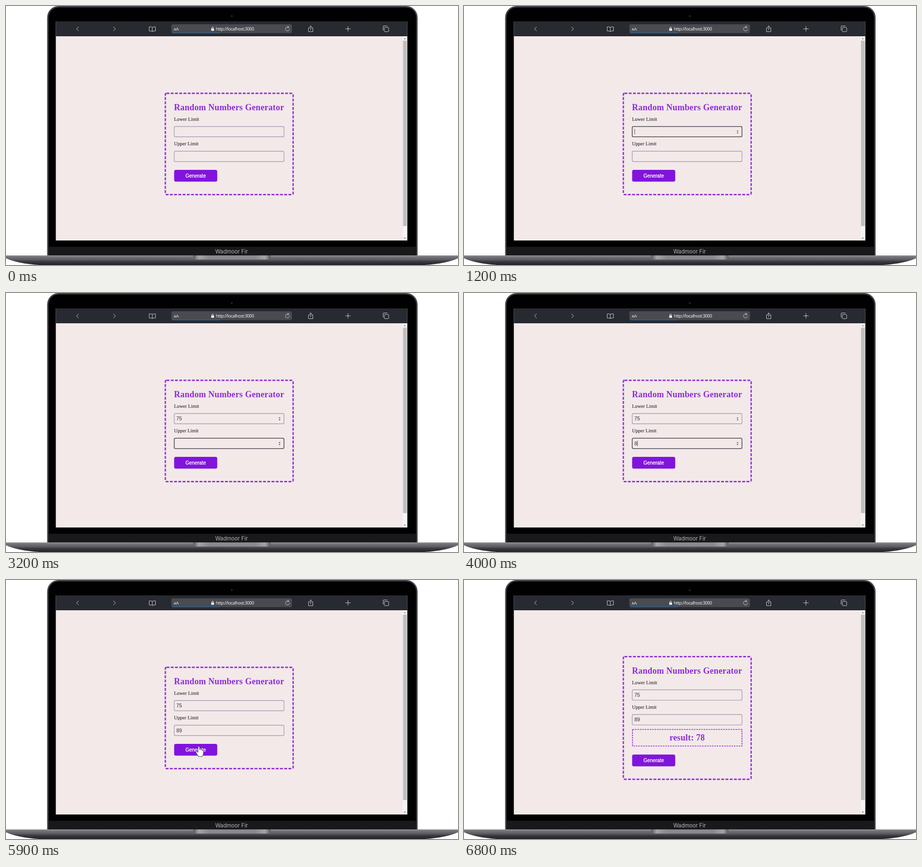
These frames come from a looping animation (939x539 px, 8.1 s). An HTML page:

```html
<!DOCTYPE html>
<html lang="en">
<head>
<meta charset="utf-8">
<title>Random Numbers Generator</title>
<style>
html, body { margin: 0; width: 100%; height: 100%; overflow: hidden; background: #fff; }
svg { display: block; }
text { white-space: pre; }
.serif { font-family: "Liberation Serif", "Times New Roman", serif; }
.sans { font-family: "Liberation Sans", Arial, sans-serif; }
.head { font-size: 17.8px; letter-spacing: .23px; font-weight: bold; fill: #8b2bdc; }
.label { font-size: 10.26px; fill: #33303a; stroke: #33303a; stroke-width: .15; }
.value { font-size: 10.26px; fill: #45424a; stroke: #45424a; stroke-width: .15; }
.field rect { fill: none; stroke: #aaa1b5; stroke-width: 1.4; }
.field.focus rect { stroke: #504d57; stroke-width: 1.6; }
.icon { fill: none; stroke: #c9cacd; stroke-width: 1; stroke-linecap: round; stroke-linejoin: round; }
.cursor { fill: #fff; stroke: #333; stroke-width: .8; stroke-linejoin: round; }
</style>
</head>
<body>
<svg width="939" height="539" viewBox="0 0 939 539">
  <defs>
    <linearGradient id="base" x2="0" y2="1">
      <stop offset="0" stop-color="#97979b"/><stop offset=".15" stop-color="#747479"/>
      <stop offset=".45" stop-color="#5b5b60"/><stop offset=".62" stop-color="#3c3c42"/>
      <stop offset="1" stop-color="#202126"/>
    </linearGradient>
    <linearGradient id="notch">
      <stop offset="0" stop-color="#58585c"/><stop offset=".07" stop-color="#a5a5a8"/>
      <stop offset=".2" stop-color="#8a8a8e"/><stop offset=".8" stop-color="#8a8a8e"/>
      <stop offset=".93" stop-color="#a5a5a8"/><stop offset="1" stop-color="#58585c"/>
    </linearGradient>
  </defs>

  <!-- laptop -->
  <path d="M85.500 520V24A24 24 0 0 1 109.500 0H831A24 24 0 0 1 855 24V520Z" fill="#2c2d32"/>
  <path d="M86.500 520V24A23 23 0 0 1 109.500 1H831A23 23 0 0 1 854 24V520Z" fill="#5a5c63"/>
  <path d="M87.700 520V24A21.800 21.800 0 0 1 109.500 2.200H831A21.800 21.800 0 0 1 852.800 24V520Z" fill="#17181b"/>
  <path d="M89 520V24A20.500 20.500 0 0 1 109.500 3.500H831A20.500 20.500 0 0 1 851.500 24V520Z" fill="#010101"/>
  <path d="M89 501H851.500V520H89Z" fill="#19191b"/>
  <circle cx="469" cy="21" r="2.200" fill="#202124"/>
  <text x="468.500" y="514.500" text-anchor="middle" font-family="Inter, sans-serif" font-size="11.2" fill="#b5b5b8">Wadmoor Fir</text>
  <path d="M0 519H939V525Q915 536 870 539H69Q24 536 0 525Z" fill="url(#base)"/>
  <path d="M389 519H549.500V522Q549.500 527.500 543 527.500H395.500Q389 527.500 389 522Z" fill="url(#notch)"/>

  <!-- browser -->
  <path d="M103.500 32H833.500V488H103.500Z" fill="#f3e9e9"/>
  <path d="M103.500 32H833.500V63H103.500Z" fill="#282a31"/>
  <rect x="343.500" y="38" width="250.500" height="18.500" rx="3.500" fill="#494b50"/>
  <path d="M345 55.800H444" stroke="#2d69a3" stroke-width="1.3"/>
  <g class="icon">
    <path d="M150.500 43.500L146.500 47.500L150.500 51.500M223.500 43.500L227.500 47.500L223.500 51.500"/>
    <path d="M304 44.500Q301 42.500 297.500 43.500V52Q301 51.500 304 53Q307 51.500 310.500 52V43.500Q307 42.500 304 44.500V53"/>
    <path d="M587.500 44.500A4.200 4.200 0 1 0 589 48M585.500 41.500L588 44.500L584.500 45.500"/>
    <path d="M631 45.500H628.500V53.500H637.500V45.500H635M633 50V41.500M630.800 43.500L633 41.300L635.200 43.500"/>
    <path d="M705.500 47.500H715.500M710.500 42.500V52.500"/>
    <rect x="786" y="44.500" width="9" height="9" rx="1.500"/>
    <path d="M783.500 50.500V43Q783.500 41.500 785 41.500H792"/>
  </g>
  <g fill="#fff">
    <text x="348.500" y="51" class="sans" font-size="7">A</text>
    <text x="353" y="51" class="sans" font-size="9">A</text>
    <rect x="426.500" y="47" width="5.500" height="4.500" rx=".6"/>
    <path d="M427.700 47V45.500A1.500 1.500 0 0 1 430.800 45.500V47" fill="none" stroke="#fff"/>
    <text x="436" y="51" font-family="Open Sans, sans-serif" font-size="9" letter-spacing="-.38">http://localhost:3000</text>
  </g>
  <path d="M824 63H833.500V488H824Z" fill="#f5f3f3"/>
  <path d="M824.700 72H832.700V458H824.700Z" fill="#c1bfbf"/>
  <path d="M826.500 69L828.500 66.800L830.500 69ZM826.500 482L828.500 484.200L830.500 482Z" fill="#66666a"/>

  <!-- form -->
  <rect id="frame" x="331" width="265.500" rx="2.500" fill="none" stroke="#9435da" stroke-width="2.850" stroke-dasharray="5.9 2.9"/>
  <g id="upper">
    <text x="349" y="217" class="serif head">Random Numbers Generator</text>
    <text x="349" y="239" class="serif label">Lower Limit</text>
    <text x="349" y="290" class="serif label">Upper Limit</text>
    <g id="fields"></g>
  </g>
  <g id="result">
    <rect x="350" y="311" width="227.500" height="34.500" fill="none" stroke="#9435da" stroke-width="1.7" stroke-dasharray="3.4 1.7"/>
    <text x="463.700" y="334" text-anchor="middle" class="serif head">result: 78</text>
  </g>
  <g id="button">
    <rect x="349.300" y="341" width="89.500" height="24.500" rx="3.500" fill="#8114dc"/>
    <text x="394" y="357" text-anchor="middle" class="sans" font-size="10.26" fill="#fff" stroke="#fff" stroke-width=".3">Generate</text>
  </g>

  <path id="arrow" class="cursor" d="M0 0V15L3.500 11.700L6 17.200L8.500 16L6 10.700H10.700Z"/>
  <path id="hand" class="cursor" d="M-1.500 1.500Q0 -1 1.500 1.500V7Q3.500 5.500 4.500 7.500Q6.500 6.500 7.300 8.500Q9.500 8 9.700 10.500V15Q9.500 18 7.500 20V21.500H-1V20Q-4 16.500 -6 12.500Q-6 10 -3.500 11.200L-1.500 13Z"/>
</svg>
<script>
const LOOP = 8100;
const $ = id => document.getElementById(id);

const fields = [250.7, 302.2].map(y => {
  const g = document.createElementNS("http://www.w3.org/2000/svg", "g");
  g.innerHTML = `<rect x="349.5" y="${y}" width="228" height="21.600" rx="2.500"/>
    <text x="354" y="${y + 14.5}" class="sans value"></text>
    <path class="caret" d="M0 ${y + 5}v11.500" stroke="#55525c"/>
    <path class="spin" d="M566.5 ${y + 10}l1.800 -2.500 1.800 2.500zm0 2.200l1.800 2.500 1.800 -2.500z" fill="#4b4950"/>`;
  $("fields").append(g);
  return { g, text: g.querySelector("text"), caret: g.querySelector(".caret"), spin: g.querySelector(".spin") };
});

// [time, value]; each value holds until the next one
const typed = [
  [[0, ""], [1900, "7"], [2300, "75"]],
  [[0, ""], [4000, "8"], [4600, "89"]]
];
const focus = [[0, -1], [1200, 0], [2700, 1], [5700, -1]];
const hover = [[0, -1], [700, 0], [5300, -1], [5400, 1], [5500, -1]];
const caret = [[0, 0], [1200, 1], [1700, 0], [1900, 1], [3200, 0], [3700, 1],
  [4500, 0], [4600, 1], [5100, 0]];
const mouse = [
  [0, null], [200, ["arrow", 800, 330]], [300, ["arrow", 655, 292]],
  [500, ["arrow", 612, 279]], [600, ["arrow", 584, 270]], [700, null],
  [5300, ["arrow", 424, 278]], [5400, null], [5500, ["hand", 402, 345]],
  [5700, ["hand", 400.5, 346]], [6000, ["arrow", 399, 346]], [6400, ["arrow", 500, 336]],
  [6500, ["arrow", 690, 312]], [6600, ["arrow", 844, 294]], [6800, null]
];

const at = (steps, t) => steps.findLast(s => s[0] <= t)[1];
const show = (el, on) => el.setAttribute("visibility", on ? "visible" : "hidden");
const move = (el, x, y) => el.setAttribute("transform", `translate(${x} ${y})`);

function draw(t) {
  const shift = t >= 6000 ? 22.2 : 0;
  move($("upper"), 0, -shift);
  move($("button"), 0, shift);
  $("frame").setAttribute("y", 181.7 - shift);
  $("frame").setAttribute("height", 210.8 + 2 * shift);
  show($("result"), shift > 0);

  const active = at(focus, t), over = at(hover, t);
  fields.forEach((f, i) => {
    const value = at(typed[i], t);
    f.text.textContent = value;
    f.g.setAttribute("class", active === i ? "field focus" : "field");
    show(f.spin, active === i || over === i);
    show(f.caret, active === i && at(caret, t));
    move(f.caret, 354.7 + 5.7 * value.length, 0);
  });

  const pointer = at(mouse, t);
  for (const kind of ["arrow", "hand"]) {
    const on = pointer && pointer[0] === kind;
    show($(kind), on);
    if (on) move($(kind), pointer[1], pointer[2]);
  }
}

function tick() {
  draw(performance.now() % LOOP);
  requestAnimationFrame(tick);
}
tick();
</script>
</body>
</html>
```
